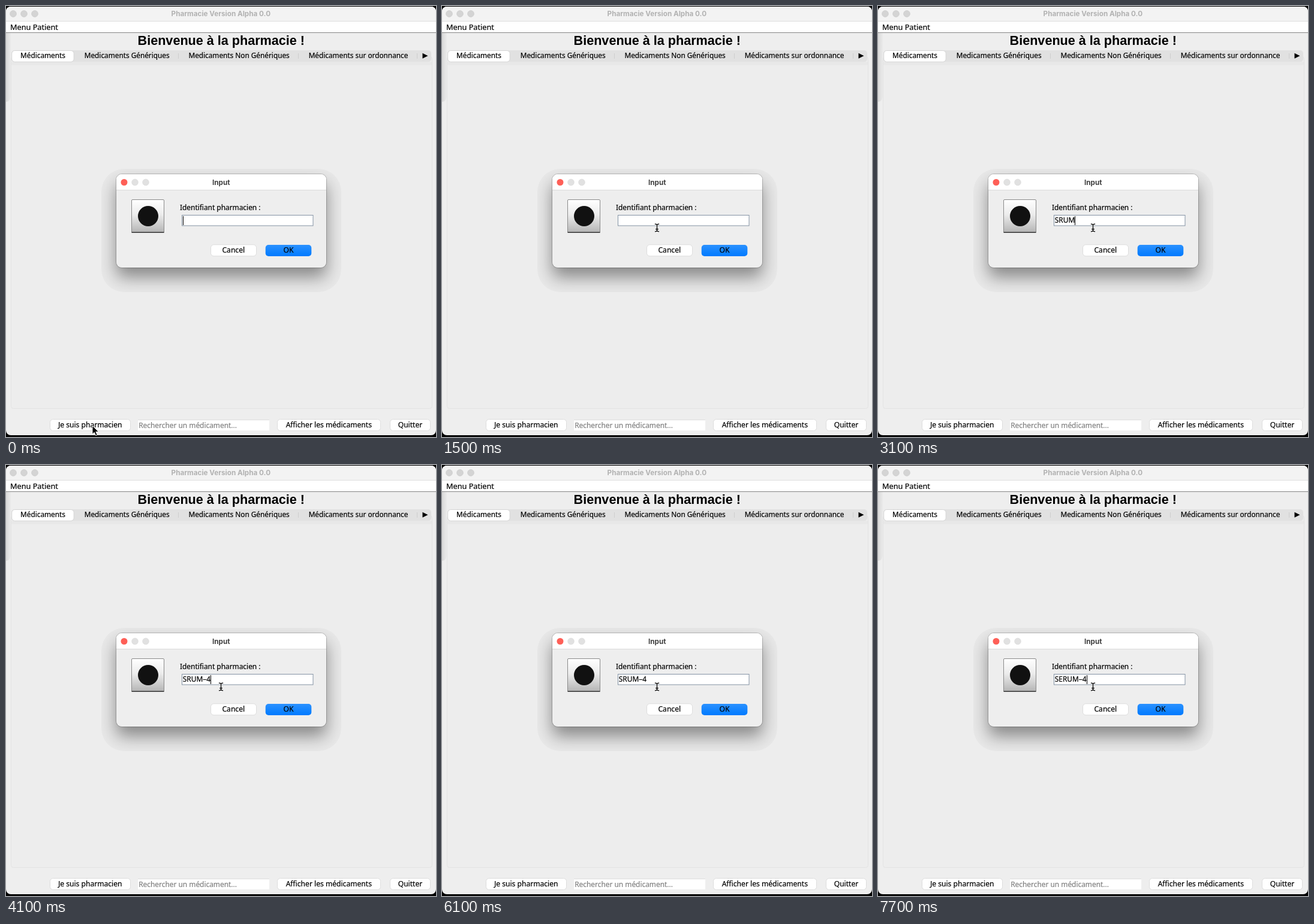
These frames come from a looping animation (717 px wide and 720 px high, 8 s). An HTML page:

```html
<!DOCTYPE html>
<html lang="fr">
<head>
<meta charset="utf-8">
<title>Pharmacie</title>
<style>
  html, body { margin: 0; width: 100%; height: 100%; overflow: hidden; background: #000; }
  svg { display: block; width: 717px; height: 720px; }
  text {
    font: 11.9px "Noto Sans", "Open Sans", sans-serif; white-space: pre;
    color: #000; fill: currentColor; stroke: currentColor; stroke-width: .2px;
  }
  .mid { text-anchor: middle; }
  .tab { font-size: 11.8px; }
  .btn { font-size: 12.1px; }
  .bar { font: 700 11.7px Inter, "Liberation Sans", sans-serif; stroke: none; }
  .head { font: 700 21.6px "Liberation Sans", Arial, sans-serif; stroke: none; }
</style>
</head>
<body>
<svg viewBox="0 0 717 720" xmlns="http://www.w3.org/2000/svg">
  <defs>
    <linearGradient id="blue" x2="0" y2="1">
      <stop stop-color="#2b91ff"/><stop offset="1" stop-color="#007aff"/>
    </linearGradient>
    <linearGradient id="tile" x2="0" y2="1">
      <stop stop-color="#fff"/><stop offset=".45" stop-color="#ececec"/><stop offset="1" stop-color="#b4b4b4"/>
    </linearGradient>
    <linearGradient id="edge">
      <stop stop-color="#000" stop-opacity=".09"/><stop offset="1" stop-color="#000" stop-opacity=".015"/>
    </linearGradient>
    <filter id="blur" x="-30%" y="-50%" width="160%" height="200%"><feGaussianBlur stdDeviation="14"/></filter>
    <clipPath id="halo"><rect x="159" y="272" width="400" height="206" rx="38"/></clipPath>
    <clipPath id="box"><rect x="184" y="281" width="350" height="156" rx="9"/></clipPath>
    <path id="ibeam" d="M-3 -6.3Q-.5 -6.3 0 -4.8Q.5 -6.3 3 -6.3M0 -4.8V4.8M-3 6.3Q-.5 6.3 0 4.8Q.5 6.3 3 6.3M-1.8 2.2H1.8"/>
  </defs>

  <!-- main window -->
  <rect width="717" height="720"/>
  <rect y="1" width="717" height="716" rx="8" fill="#eee"/>
  <path d="M0 26V9a8 8 0 0 1 8-8H709a8 8 0 0 1 8 8V26Z" fill="#f3f3f3"/>
  <rect y="26" width="717" height="18" fill="#fff"/>
  <rect y="25" width="717" height="1" fill="#dedede"/>
  <rect y="44" width="717" height="1" fill="#858585"/>
  <path d="M0 45H8V148Q8 160 0 160Z" fill="url(#edge)"/>
  <g fill="#d4d4d4" stroke="#c6c6c6" stroke-width=".6">
    <circle cx="12" cy="13" r="5.4"/><circle cx="30" cy="13" r="5.4"/><circle cx="48" cy="13" r="5.4"/>
  </g>
  <text class="bar mid" x="358.3" y="17" style="color:#b2b2b2">Pharmacie Version Alpha 0.0</text>
  <text x="7" y="39.5" style="font-size:12.7px">Menu Patient</text>
  <text class="head mid" x="358.8" y="65">Bienvenue à la pharmacie !</text>

  <!-- tabs -->
  <rect x="8.5" y="84.5" width="702" height="588" rx="4" fill="#ededed" stroke="#e3e3e3"/>
  <rect x="9" y="74" width="700" height="19.5" rx="5" fill="#e1e1e1"/>
  <rect x="9" y="93.5" width="701" height="5" fill="#e8e8e8"/>
  <rect x="9.7" y="74.5" width="103.5" height="18.8" rx="5" fill="#fff" stroke="#cfcfcf" stroke-width=".8"/>
  <path d="M287.5 79v9M487.5 79v9M685.5 79v9" stroke="#cecece"/>
  <path d="M694.5 78.7L703.5 83.2L694.5 87.7Z"/>
  <text class="tab mid" x="61.5" y="87.3">Médicaments</text>
  <text class="tab mid" x="201.7" y="87.3">Medicaments Génériques</text>
  <text class="tab mid" x="388.6" y="87.3">Medicaments Non Génériques</text>
  <text class="tab mid" x="587.5" y="87.3">Médicaments sur ordonnance</text>

  <!-- bottom row -->
  <g fill="#fff" stroke="#d6d6d6" stroke-width=".8">
    <rect x="73.5" y="690.5" width="134" height="19" rx="5"/>
    <rect x="452.5" y="690.5" width="172" height="19" rx="5"/>
    <rect x="640.5" y="690.5" width="67" height="19" rx="5"/>
  </g>
  <rect x="220" y="691" width="219" height="18" fill="#fff"/>
  <path d="M220 691.4h219" stroke="#dcdcdc"/>
  <text class="btn mid" x="140.2" y="704">Je suis pharmacien</text>
  <text x="221.2" y="704.5" style="color:#808080">Rechercher un médicament...</text>
  <text class="btn mid" x="538.3" y="704">Afficher les médicaments</text>
  <text class="btn mid" x="674" y="704">Quitter</text>

  <!-- dialog -->
  <g clip-path="url(#halo)">
    <rect x="159" y="272" width="400" height="206" fill="#e8e8e8"/>
    <rect x="184" y="297" width="350" height="156" rx="9" opacity=".41" filter="url(#blur)"/>
  </g>
  <rect x="183.5" y="280.5" width="351" height="157" rx="9.5" fill="none" stroke="#000" stroke-opacity=".2"/>
  <g clip-path="url(#box)">
    <rect x="184" y="281" width="350" height="156" fill="#eee"/>
    <rect x="184" y="281" width="350" height="26" fill="#fff"/>
    <rect x="184" y="307" width="350" height="1" fill="#dadada"/>
  </g>
  <circle cx="197" cy="294.5" r="5.5" fill="#fe5f57"/>
  <g fill="#e1e1e1" stroke="#d5d5d5" stroke-width=".6">
    <circle cx="215" cy="294.5" r="5.3"/><circle cx="233" cy="294.5" r="5.3"/>
  </g>
  <text class="bar mid" x="358.7" y="298.5" style="color:#404040">Input</text>
  <rect x="209.5" y="323.5" width="54" height="55" rx="1.5" fill="url(#tile)" stroke="#8a8a8a"/>
  <path d="M209.5 378.3h54" stroke="#333" stroke-width="1.4"/>
  <circle cx="237" cy="351" r="17" fill="#111"/>
  <text x="290" y="341.3">Identifiant pharmacien :</text>
  <rect x="293.5" y="349.5" width="218.5" height="17.5" fill="#fff" stroke="#8493a4"/>
  <rect x="341.5" y="398.8" width="76" height="19" rx="5" fill="#fff" stroke="#d6d6d6" stroke-width=".8"/>
  <rect x="432.7" y="399" width="76.6" height="19" rx="5" fill="url(#blue)"/>
  <text class="btn mid" x="379.3" y="412.3">Cancel</text>
  <text class="btn mid" x="471" y="412.3">OK</text>
  <text id="entry" x="294.8" y="362.3"></text>
  <rect id="caret" y="351" width="1" height="15"/>

  <!-- pointers -->
  <path id="arrow" d="M0 0V14.2L3.3 11.3L5.7 16.7L8.2 15.6L5.8 10.3H10.4Z" stroke="#fff" stroke-width=".9" stroke-linejoin="round"/>
  <g id="beam" transform="translate(358.5 370.5)" fill="none" stroke-linecap="round">
    <use href="#ibeam" stroke="#fff" stroke-width="2.6"/>
    <use href="#ibeam" stroke="#111" stroke-width="1.5"/>
  </g>
</svg>
<script>
const LOOP = 8000, BLINK = 500;
const $ = id => document.getElementById(id);
const entry = $('entry'), caret = $('caret'), arrow = $('arrow'), beam = $('beam');

// time, text, caret index; each edit restarts the blink
const DRAFT = 'SRUM–4', FINAL = 'SERUM–4';
const edits = [
  [0, '', 0],
  [2400, 'S', 1], [2500, 'SR', 2], [2700, 'SRU', 3], [2800, 'SRUM', 4],
  [3300, 'SRUM–', 5], [3800, DRAFT, 6],
  [4900, DRAFT, 5], [5000, DRAFT, 4], [5100, DRAFT, 3], [5300, DRAFT, 2], [5600, DRAFT, 1],
  [6400, FINAL, 2],
  [7000, FINAL, 3], [7100, FINAL, 4], [7200, FINAL, 5], [7400, FINAL, 6], [7700, FINAL, 7]
];
// time, arrow tip
const moves = [[0, 144, 701], [400, 236, 560], [500, 324.5, 425.5], [700, 345, 392], [800, 358.5, 371]];
const BEAM_AT = 1200;

const at = (steps, t) => steps.filter(s => s[0] <= t).pop();
const show = (el, on) => el.setAttribute('visibility', on ? 'visible' : 'hidden');

function draw(t) {
  const [since, text, index] = at(edits, t);
  if (entry.textContent !== text) entry.textContent = text;
  const width = index ? entry.getSubStringLength(0, index) : 0;
  caret.setAttribute('x', Math.round(294.8 + width));
  // the last blink before a caret move falls 100 ms early, at 4800
  show(caret, Math.floor((t - since) / BLINK) % 2 === 0);

  const [, x, y] = at(moves, t);
  arrow.setAttribute('transform', `translate(${x} ${y})`);
  show(arrow, t < BEAM_AT);
  show(beam, t >= BEAM_AT);
}

const start = performance.now();
function tick() {
  draw((performance.now() - start) % LOOP);
  requestAnimationFrame(tick);
}
draw(0);
tick();
</script>
</body>
</html>
```
